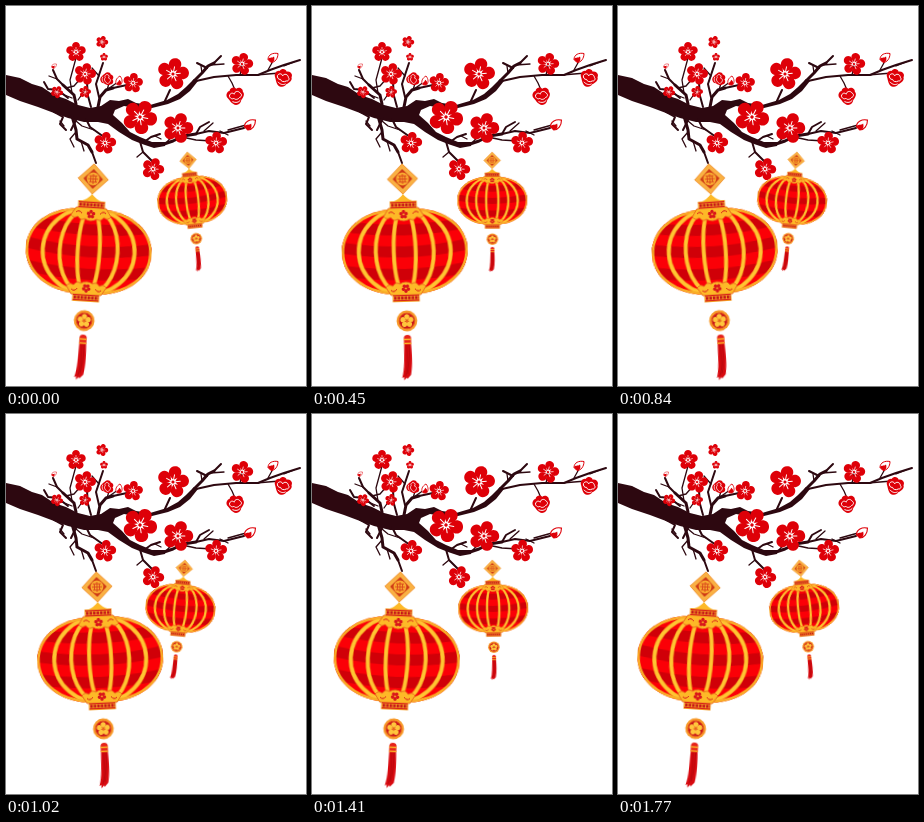
These frames come from a looping animation (300x380 px, 1800 ms). An HTML page:

```html
<!DOCTYPE html>
<html lang="en">
<head>
<meta charset="utf-8">
<title>Lanterns under a plum branch</title>
<style>
  html, body { margin: 0; width: 100%; height: 100%; overflow: hidden; background: #fff; }
  svg { display: block; width: 300px; height: 380px; }
  .twigs { fill: none; stroke: #2d0810; stroke-linecap: round; stroke-linejoin: round; }
  .swing { animation: swing 900ms cubic-bezier(.364, 0, .636, 1) infinite alternate; transform-origin: 0 0; }
  .big { --from: 4.07deg; --to: -4.07deg; animation-delay: -130ms; }
  .small { --from: -6deg; --to: 6deg; animation-delay: -1790ms; }
  @keyframes swing {
    from { transform: rotate(var(--from)); }
    to { transform: rotate(var(--to)); }
  }
</style>
</head>
<body>
<svg viewBox="0 0 300 380" xmlns="http://www.w3.org/2000/svg">
  <defs>
    <!-- Blossom, radius 10 -->
    <path id="petal" d="M0-1.4C-1.6-2.4-3.9-3.8-3.9-6.2C-3.9-8.6-2-10 0-10C2-10 3.9-8.6 3.9-6.2C3.9-3.8 1.6-2.4 0-1.4Z"/>
    <g id="five">
      <use href="#petal"/>
      <use href="#petal" transform="rotate(72)"/>
      <use href="#petal" transform="rotate(144)"/>
      <use href="#petal" transform="rotate(216)"/>
      <use href="#petal" transform="rotate(288)"/>
    </g>
    <g id="flower">
      <use href="#five" fill="#de0008"/>
      <path d="M0 0V-4.6M0 0L4.4-1.4M0 0L2.7 3.7M0 0L-2.7 3.7M0 0L-4.4-1.4" stroke="#fff" stroke-width=".6" stroke-linecap="round"/>
      <circle r="1" fill="#de0008"/>
    </g>
    <!-- Half-open blossom seen from the side -->
    <g id="cup" fill="#de0008">
      <path d="M-1 9C-5 8-6 4-8 1C-10-2-8-6-5-6C-4-9 0-10 2-7C5-9 9-6 8-3C10 0 7 3 5 5C4 8 2 9-1 9Z"/>
      <path d="M-6-1C-5-4-2-4-1-2C0-5 4-5 5-2C7-1 6 2 4 2C2 4-1 4-2 2C-4 3-6 1-6-1ZM-4 5C-1 7 2 7 4 5" fill="none" stroke="#fff" stroke-width=".9"/>
    </g>
    <g id="bud">
      <path d="M-5 2C-5-3 0-5 5-4C5 1 2 5-2 5Z" fill="#fff" stroke="#de0008"/>
      <path d="M-5 2C-4-1-1 1 1-1C2 2 1 5-2 5Z" fill="#de0008"/>
    </g>

    <path id="shell" d="M-63 106C-63 82-41 66-15 64H15C41 66 63 82 63 106C63 130 41 147 15 149H-15C-41 147-63 130-63 106Z"/>
    <clipPath id="inside"><use href="#shell"/></clipPath>
    <g id="ribs" fill="none">
      <ellipse cy="106.5" rx="46" ry="43"/>
      <ellipse cy="106.5" rx="29" ry="44"/>
      <ellipse cy="106.5" rx="11" ry="45"/>
    </g>
    <g id="collar">
      <path d="M-15 63H15L20 71Q17 75 13 72Q10 77 6 74Q0 78-6 74Q-10 77-13 72Q-17 75-20 71Z" fill="#fdb927" stroke="#e8641b" stroke-width=".9"/>
      <use href="#five" transform="translate(0 69.5) scale(.44)" fill="#d9141a"/>
      <path d="M-15 68Q-12 65-9 69M15 68Q12 65 9 69" fill="none" stroke="#d9141a"/>
    </g>
    <g id="band">
      <rect x="-13.5" y="56" width="27" height="8" fill="#f39a22"/>
      <path d="M-13 57.5H13M-13 62.5H13" stroke="#d9241a" stroke-width="1.1"/>
      <path d="M-12 60H13" stroke="#c5161a" stroke-width="2.8" stroke-dasharray="2.4 1.1"/>
    </g>

    <!-- Whole lantern, hung from 0,0 -->
    <g id="lantern">
      <g transform="translate(0 34) rotate(45)">
        <rect x="-10.7" y="-10.7" width="21.4" height="21.4" fill="#f9b143" stroke="#f08a24" stroke-width=".8"/>
        <rect x="-7" y="-7" width="14" height="14" fill="#cf3a16"/>
      </g>
      <circle cy="34" r="6.4" fill="#f9ab30"/>
      <path d="M-4 31H4M-5 34H5M-4 37H4M0 29V39M-2.5 31V37M2.5 31V37" stroke="#d8451b" stroke-width=".9"/>
      <path d="M0 49Q3 54 12 57H-12Q-3 54 0 49Z" fill="#fdb927"/>

      <use href="#shell" fill="#fb0007"/>
      <g clip-path="url(#inside)">
        <path d="M-64 79Q0 91 64 79M-64 101Q0 113 64 101M-64 124Q0 135 64 124" fill="none" stroke="#d00008" stroke-width="11"/>
        <use href="#ribs" stroke="#f48a1c" stroke-width="4.4"/>
        <use href="#ribs" stroke="#ffc532" stroke-width="3"/>
        <use href="#shell" fill="none" stroke="#f9ad27" stroke-width="5"/>
      </g>
      <use href="#collar"/>
      <use href="#band"/>
      <g transform="matrix(1 0 0 -1 0 213)">
        <use href="#collar"/>
        <use href="#band"/>
      </g>

      <g transform="translate(0 176)">
        <circle r="10.4" fill="#f79a2a"/>
        <circle r="7.8" fill="#c9141a" stroke="#e2501c"/>
        <use href="#five" transform="scale(.68)" fill="#ffc63c"/>
        <circle r="1.3" fill="#e8641b"/>
      </g>
      <path d="M-3.4 198C-4 212-3.5 224-6.5 233L-4.6 232L-4.4 235.5L-2 232.5L-1.2 234L2.5 230C4.6 220 4 209 3.4 198Z" fill="#d80a10"/>
      <path d="M-1 200C-1 212 0 222-3 231M1.3 200C1.6 211 1 221-1 229" fill="none" stroke="#a8060c" stroke-width=".7"/>
      <path d="M-3.6 199V193Q-3.4 190 0 190Q3.4 190 3.6 193V199Z" fill="#e6211a"/>
      <path d="M-3.6 194.5H3.6M-3.6 198.5H3.6" stroke="#fdb927" stroke-width="1.5"/>
    </g>
  </defs>

  <rect width="300" height="380" fill="#fff"/>

  <!-- Branch -->
  <path fill="#2d0810" d="M0 69L14 72L26 78L36 81L48 89L60 93L72 99L84 102L95 100L104 94L113 95L122 93L130 97L144 99L161 94L172 88L180 81L188 73L192 75L184 85L174 93L162 98L146 102L130 102L118 100L109 104L107 109L116 117L124 126L134 131L146 136L160 136L159 140L148 142L136 138L126 134L113 126L102 118L92 116L78 116L62 112L48 107L32 101L14 95L0 89Z"/>
  <g class="twigs" stroke-width="3">
    <path d="M188 75L196 67L202 60L208 57M70 98L68 89L57 79M92 101L94 91L100 84L107 82M158 138L167 135L177 130L190 128M66 110L70 124L71 133L82 139L86 146"/>
  </g>
  <g class="twigs" stroke-width="2">
    <path d="M208 57L215 50M201 62L191 57M190 75L208 71L230 69L252 69L264 64L278 59L294 54"/>
    <path d="M57 79L51 73L47 64M62 92L52 84L42 83L38 76M85 101L82 90L81 77M107 82L121 79M93 91L90 78L97 57"/>
    <path d="M190 128L203 125L218 127L238 122M190 128L194 121L203 116M133 132L137 146L147 156M138 136L145 131L154 128M158 97L164 84"/>
    <path d="M48 106L57 111L54 118L60 124M86 146L90 157M80 113L84 121L98 131M71 112L65 124"/>
  </g>
  <g class="twigs" stroke-width="1.3">
    <path d="M204 59L218 58M250 69L274 67M262 64L267 55M222 70L226 77L229 84M234 69L236 60M278 60L288 56M196 67L195 60"/>
    <path d="M198 125L207 117M176 131L190 134L206 135M222 124L240 119M214 125L222 129M137 146L131 151M160 137L170 126M149 130L155 133"/>
    <path d="M70 126L64 133L68 141M58 120L54 115M75 135L78 145M64 110L76 120L88 124M99 85L112 76M72 94L79 84M51 73L43 70M66 87L64 74L70 52M93 70L86 62M60 82L68 80L75 72M48 84L44 90M66 92L56 88M101 84L104 74"/>
  </g>

  <!-- Blossoms -->
  <use href="#flower" transform="translate(70 46)"/>
  <use href="#flower" transform="translate(96 36) scale(.62) rotate(20)"/>
  <use href="#flower" transform="translate(98 51) scale(.4)"/>
  <use href="#flower" transform="translate(79 68) scale(1.1) rotate(15)"/>
  <use href="#cup" transform="translate(101 73) rotate(80) scale(.75)"/>
  <use href="#bud" transform="translate(113 75) scale(.8) rotate(-40)"/>
  <use href="#bud" transform="translate(48 60) scale(.5)"/>
  <use href="#flower" transform="translate(127 77) rotate(8)"/>
  <use href="#flower" transform="translate(51 86) scale(.62) rotate(30)"/>
  <use href="#flower" transform="translate(79 86) scale(.6) rotate(10)"/>
  <use href="#flower" transform="translate(167 68) scale(1.6) rotate(12)"/>
  <use href="#flower" transform="translate(134 111) scale(1.72) rotate(28)"/>
  <use href="#flower" transform="translate(172 122) scale(1.52) rotate(18)"/>
  <use href="#flower" transform="translate(99 137) scale(1.12) rotate(10)"/>
  <use href="#flower" transform="translate(147 163) scale(1.12) rotate(20)"/>
  <use href="#flower" transform="translate(210 137) scale(1.12) rotate(5)"/>
  <use href="#flower" transform="translate(236 58) scale(1.12) rotate(14)"/>
  <use href="#cup" transform="translate(229.5 90) rotate(-10)"/>
  <use href="#cup" transform="translate(277 72) rotate(15)"/>
  <use href="#bud" transform="translate(267 51.5)"/>
  <use href="#bud" transform="translate(244 118.5) scale(1.1)"/>

  <!-- Lanterns -->
  <g transform="translate(180.1 135.5) scale(.555)"><g class="swing small"><use href="#lantern"/></g></g>
  <g transform="translate(89.4 139)"><g class="swing big"><use href="#lantern"/></g></g>
</svg>
</body>
</html>
```
